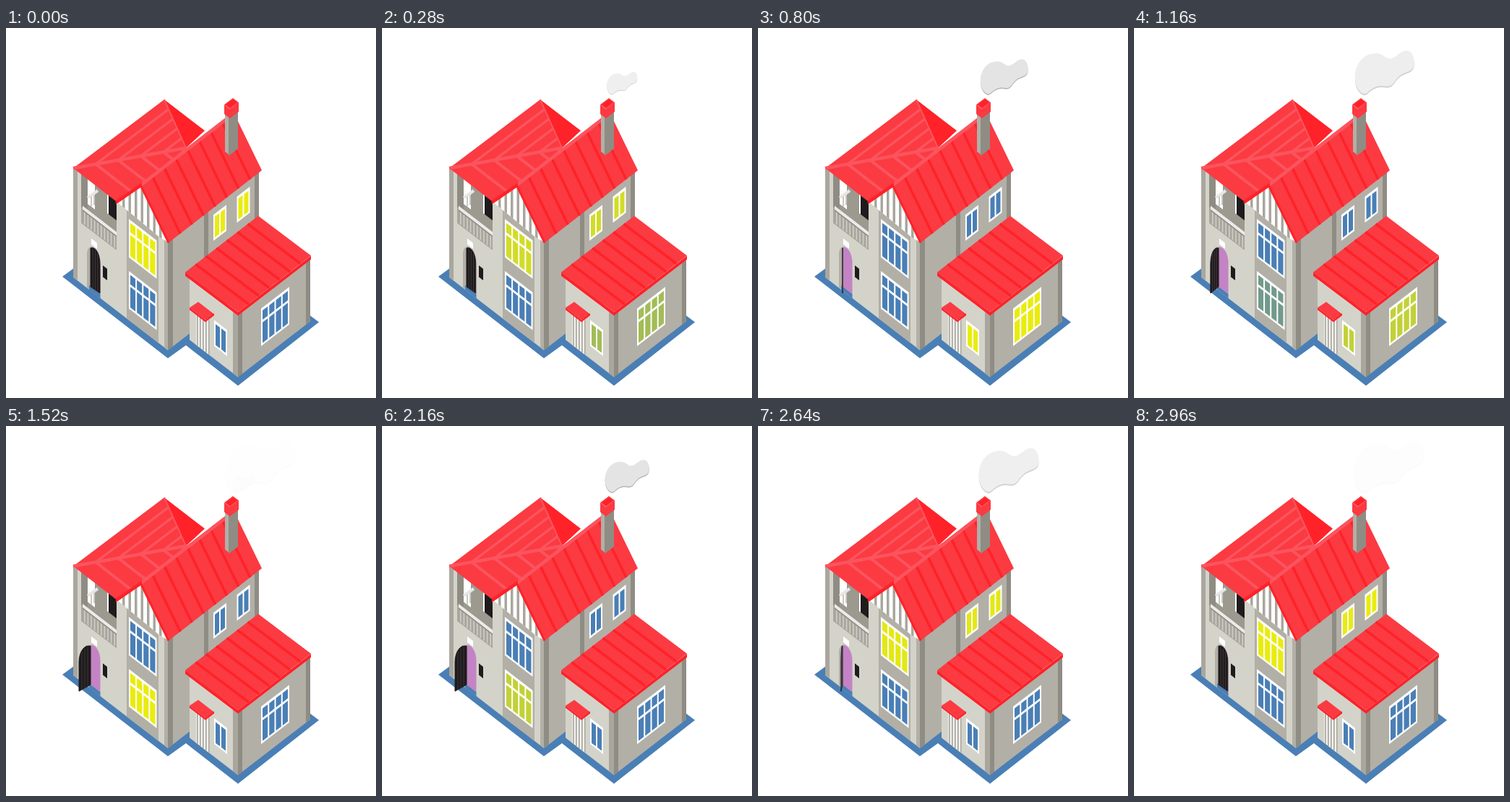
An HTML page that plays this animation: 512x512 px, repeating every 3000 ms.

```html
<!DOCTYPE html>
<html lang="en">
<head>
<meta charset="utf-8">
<title>Isometric house</title>
<style>
  html, body { margin: 0; width: 100%; height: 100%; overflow: hidden; background: #fff; }
  svg { display: block; width: 100%; height: 100%; }
</style>
</head>
<body>
<svg id="stage" viewBox="0 0 512 512"></svg>
<script>
const LOOP = 3000;
const SLOPE = .77; // screen drop per pixel along either ground axis
const LIGHT = '#d3d3ca', MID = '#b2afa7', SHADE = '#a9a69d', DARK = '#8f8c84', INNER = '#9c998f';
const RED = '#fb3a42', DEEP = '#ff2229', PALE = '#fb545e', INK = '#1f1b1c';
const BLUE = [74, 127, 181], YELLOW = [233, 236, 14];
const GROUND = `rgb(${BLUE})`;

const repeat = (n, draw) => Array.from({ length: n }, (_, i) => draw(i)).join('');
const mix = (a, b, k) => a.map((v, i) => v + (b[i] - v) * k);
const add = (a, b) => a.map((v, i) => v + b[i]);
const poly = (fill, ...points) => `<polygon fill="${fill}" points="${points.join(' ')}"/>`;
const line = (color, width, from, to) =>
  `<path stroke="${color}" stroke-width="${width}" d="M${from}L${to}"/>`;

// Upright band whose top and bottom edges share a slope
const bandPath = (x, y, w, h, slope) => `M${x} ${y}l${w} ${w * slope}v${h}l${-w} ${-w * slope}z`;
const band = (fill, ...shape) => `<path fill="${fill}" d="${bandPath(...shape)}"/>`;

// Parallelogram spanned by u and v, with seams that run along v
function plane(fill, origin, u, v, parts = 1) {
  const far = add(origin, u);
  return poly(fill, origin, far, add(far, v), add(origin, v)) +
    repeat(parts - 1, i => {
      const top = mix(origin, far, (i + 1) / parts);
      return line(DEEP, 3.5, top, add(top, v));
    });
}

// A wall draws panels by screen x and height z above its ground line
function wall(x0, y0, slope) {
  const ground = x => y0 + (x - x0) * slope;
  const shape = (x, w, z, h) => bandPath(x, ground(x) - z - h, w, h, slope);
  const panel = (fill, ...box) => `<path fill="${fill}" d="${shape(...box)}"/>`;
  function glazing(group, columns, x, w, z, h) {
    const step = (w - 2) / columns, transom = columns > 2;
    const low = z + 3, high = z + h - 4, split = high - 13;
    let panes = '';
    for (let i = 0; i < columns; i++) {
      const left = x + 2 + i * step, width = step - 2;
      panes += shape(left, width, low, (transom ? split - 3.5 : high) - low);
      if (transom) panes += shape(left, width, split, high - split);
    }
    return panel('#fff', x, w, z, h) + `<path class="${group}" d="${panes}"/>`;
  }
  return { panel, glazing };
}

const front = wall(93, 345, SLOPE), side = wall(224, 446, -SLOPE);
const annexFront = wall(321, 483, SLOPE), annexSide = wall(321, 483, -SLOPE);

const walls =
  poly(GROUND, [78, 344], [93, 333], [224, 425], [421, 398], [433, 407], [321, 495], [249, 439], [224, 457]) +
  front.panel(LIGHT, 93, 131, 0, 151) +
  front.panel(SHADE, 93, 6, 0, 151) +
  front.panel(MID, 167, 44, 0, 151) +
  front.panel(MID, 219, 5, 0, 151) +
  side.panel(MID, 224, 126, 0, 151) +
  [[224, 7], [274, 6], [344, 6]].map(([x, w]) => side.panel(DARK, x, w, 0, 151)).join('');

const balcony =
  front.panel(INNER, 104, 49, 84, 68) +
  front.panel(DARK, 104, 9, 84, 68) +
  front.panel('#fff', 113, 10, 117, 40) +
  front.panel('#fff', 140, 2, 125, 27) +
  front.panel(INK, 142, 11, 125, 27) +
  line('#e6e6e4', 4, [113, 235], [127, 225]) +
  repeat(2, i => line('#c9c8c4', 2, [118 + 4 * i, 233 - 2 * i], [118 + 4 * i, 247 - 2 * i])) +
  front.panel(SHADE, 104, 49, 84, 22) +
  repeat(10, i => front.panel('#d0cec8', 108 + i * 4.6, 1.6, 85, 17)) +
  front.panel(DARK, 106, 47, 102, 2) +
  front.panel('#ebebea', 106, 47, 104, 5);

const entrance =
  `<path fill="${MID}" d="M112 359V313C112 304 117 301 121 303V366Z"/>` +
  front.panel(GROUND, 115, 15.5, 0, 6) +
  `<path fill="#c383c4" d="M117 358V304C124 301 130.500 313 130.500 325V368Z"/>` +
  `<path id="door" fill="${INK}" stroke="${INK}"/>` +
  `<path id="boards" stroke="#454142" stroke-width=".8"/>` +
  front.panel('#fff', 118, 8, 65, 8) +
  front.panel(INK, 134, 6, 32, 16);

const gable =
  `<clipPath id="gable"><path d="M154 241L187 218L224 296L213 290Z"/></clipPath><g clip-path="url(#gable)">` +
  front.panel('#fff', 150, 74, 0, 250) +
  repeat(7, i => front.panel(SHADE, 161 + i * 8.5, 3.5, 0, 250)) + '</g>';

const mainWindows =
  front.glazing('early', 4, 170, 38.5, 87, 53) +
  front.glazing('late', 4, 170, 38.5, 16, 52) +
  repeat(2, i => side.glazing('early', 2, 287 + 32.5 * i, 18, 103, 36));

const corner = [93, 194], peak = [219, 99], valley = [249, 166], eave = [155, 242];
const roof =
  poly(RED, corner, peak, valley, [187, 219], eave) +
  repeat(4, i => {
    const k = (i + 1) / 5, bend = mix(corner, valley, k);
    return line(PALE, 3.5, bend, mix(peak, valley, k)) + line(PALE, 4, bend, mix(eave, valley, k));
  }) +
  line(PALE, 4.5, corner, valley) +
  poly(DEEP, peak, [275, 142], valley) +
  line(PALE, 2, peak, valley) +
  plane(RED, [187, 219], [129, -100], [38, 78], 8) +
  band(PALE, 187, 214, 122, 6, -SLOPE) +
  band(DEEP, 152, 238.5, 36, 5.5, -.68) +
  line(DEEP, 3, [187, 219], [225, 297]);

const chimney =
  band(MID, 303, 116, 6, 55, SLOPE) +
  band(DARK, 308, 121, 13, 56, -SLOPE) +
  band(RED, 302, 106, 8, 13, SLOPE) +
  band(RED, 310, 112, 12, 13, -SLOPE) +
  plane(RED, [302, 106], [12, -9], [8, 6]) +
  plane(DEEP, [304.500, 106], [9.5, -7], [5.5, 4]);

const annex =
  annexFront.panel(LIGHT, 254, 67, 0, 87) +
  annexFront.panel(SHADE, 314, 7, 0, 87) +
  annexSide.panel(MID, 321, 100, 0, 87) +
  annexSide.panel(DARK, 321, 6, 0, 87) +
  annexSide.panel(DARK, 415, 6, 0, 87) +
  annexFront.panel('#f1f1ef', 263, 19, 0, 48) +
  repeat(5, i => annexFront.panel(SHADE, 264 + i * 4, 1.7, 0, 48)) +
  plane(RED, [254, 387], [12, -8], [22, 17]) +
  band(DEEP, 254, 387, 22, 3, SLOPE) +
  band(DEEP, 276, 404, 12, 3, -SLOPE) +
  annexFront.glazing('middle', 2, 288, 18, 17.5, 36) +
  annexSide.glazing('middle', 4, 353, 39, 18, 52) +
  plane(RED, [248, 338], [101, -78], [73, 55], 7) +
  band(DEEP, 248, 338, 73, 5, .753) +
  band(DEEP, 321, 393, 101, 5, -SLOPE);

// The cloud is drawn with the chimney mouth at its origin
const cloud = 'M0-1C-6-4-9-11-9-19C-9-35 1-46 14-46C23-46 24-40 30-40' +
  'C38-41 41-49 49-49C55-48 57-42 57-35C57-24 46-26 40-20C34-15 34-9 26-9' +
  'C17-11 12-8 7-4C4-1 2 0 0-1Z';
const puffShape = `<g class="puff"><path fill="#b5b5b5" transform="translate(0 1.600)" d="${cloud}"/>` +
  `<path fill="#e4e4e4" d="${cloud}"/></g>`;

const stage = document.getElementById('stage');
stage.innerHTML = walls + balcony + entrance + gable + mainWindows + roof + chimney + annex +
  puffShape + puffShape;

const door = document.getElementById('door');
const boards = document.getElementById('boards');
const puffs = stage.querySelectorAll('.puff');
const lights = ['early', 'middle', 'late'].map(name => stage.querySelectorAll('.' + name));

const ramp = (t, from, to) => Math.min(1, Math.max(0, (t - from) / (to - from)));
const ease = (t, from, to) => { const p = ramp(t, from, to); return p * p * (3 - 2 * p); };
const glow = k => `rgb(${mix(BLUE, YELLOW, k).map(Math.round)})`;

function setDoor(open) {
  const hinge = 117, edge = 130 - 29 * open, span = edge - hinge;
  door.setAttribute('d', `M${hinge} 358V304.500C${hinge + span * .55} 302 ${edge} 313 ${edge} 327V367Z`);
  boards.setAttribute('d', [.25, .5, .75].map(u =>
    `M${hinge + span * u} ${305 + 12 * u * u}V${358 + 9 * u}`).join(''));
}

function setPuff(puff, age) {
  const scale = .445 + age * .000685;
  puff.setAttribute('transform', `translate(317 92) scale(${scale})`);
  puff.setAttribute('opacity', Math.min(ease(age, 0, 520), 1 - ramp(age, 920, 1540)));
}

function render(t) {
  const levels = [
    1 - ease(t, 160, 660) + ease(t, 2200, 2700),
    ease(t, 0, 520) - ease(t, 1000, 1500),
    ease(t, 1000, 1500) - ease(t, 2000, 2500)
  ];
  levels.forEach((k, i) => lights[i].forEach(glass => glass.setAttribute('fill', glow(k))));
  setDoor(ease(t, 200, 1500) - ease(t, 2300, 3000));
  puffs.forEach((puff, i) => setPuff(puff, t - i * 1460));
}

const start = performance.now();
function tick() {
  render((performance.now() - start) % LOOP);
  requestAnimationFrame(tick);
}
tick();
</script>
</body>
</html>
```
